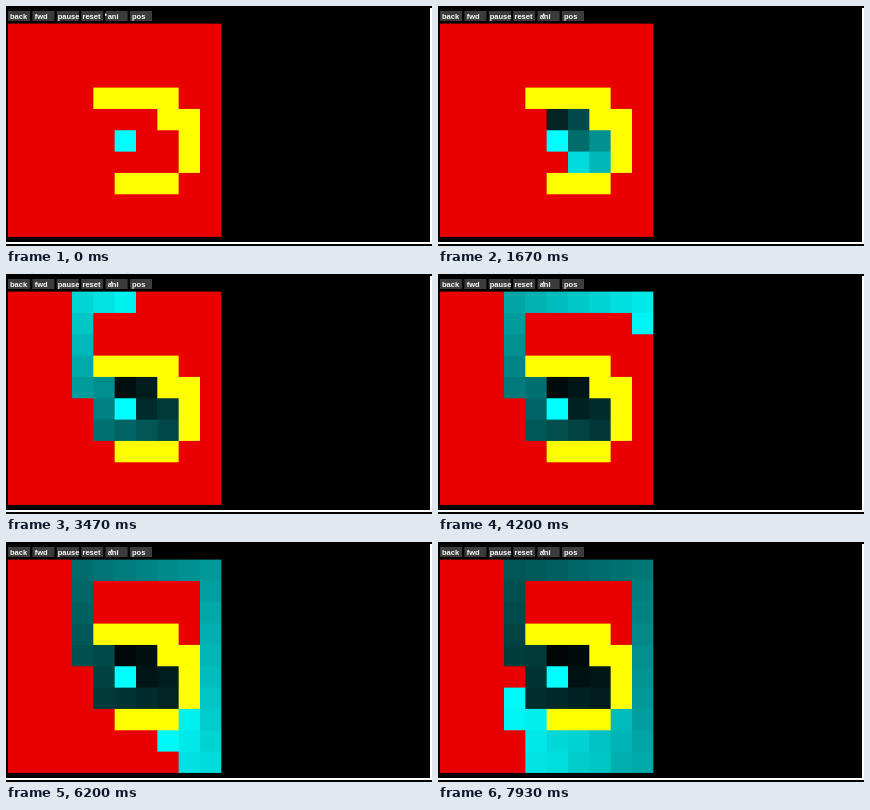
An HTML page with a canvas for the animation above (8000 ms loop, 426 by 240 pixels).

```html
<!DOCTYPE html>
<html lang="en">
<head>
<meta charset="utf-8">
<title>Depth-first walk</title>
<style>
  html, body { margin: 0; width: 100%; height: 100%; overflow: hidden; background: #000; }
  canvas { display: block; width: 426px; height: 240px; }
</style>
</head>
<body>
<canvas id="stage" width="426" height="240"></canvas>
<script>
const ctx = document.getElementById('stage').getContext('2d');

const LOOP = 8000, FRAME = 1000 / 15;
const WALK_START = 525, STEP = 1000 / 6;
const SIZE = 10, CELL = 64 / 3, LEFT = 2, TOP = 17.6;
const START = [5, 5];
const RED = '#e80000', YELLOW = '#ff0', CYAN = '#0ff';

// Wall runs: column, row, width, height
const WALLS = [[4, 3, 4, 1], [7, 4, 2, 1], [8, 5, 1, 2], [5, 7, 3, 1]];
const BUTTONS = ['back', 'fwd', 'pause', 'reset', 'ani', 'pos'];
const LABEL_X = [4, 28.7, 51.7, 76.5, 101.7, 126];

const cellKey = (col, row) => row * SIZE + col;

function isWall(col, row) {
  return WALLS.some(([c, r, w, h]) => col >= c && col < c + w && row >= r && row < r + h);
}

// Depth-first visiting rank of each cell, trying up, right, down, left
function explore() {
  const rank = new Map();
  function visit(col, row) {
    const key = cellKey(col, row);
    const inside = col >= 0 && row >= 0 && col < SIZE && row < SIZE;
    if (!inside || isWall(col, row) || rank.has(key)) return;
    rank.set(key, rank.size);
    visit(col, row - 1);
    visit(col + 1, row);
    visit(col, row + 1);
    visit(col - 1, row);
  }
  visit(...START);
  return rank;
}
const rank = explore();

function cellColor(col, row, count) {
  if (isWall(col, row)) return YELLOW;
  const k = rank.get(cellKey(col, row));
  if (k === 0) return CYAN;
  if (!(k <= count)) return RED;
  const level = Math.round(255 * k / (count + 1));
  return `rgb(0, ${level}, ${level})`;
}

// Adding light lets the soft edges of neighbouring cells blend without seams
function drawBoard(count) {
  ctx.globalCompositeOperation = 'lighter';
  for (let row = 0; row < SIZE; row++) {
    for (let col = 0; col < SIZE; col++) {
      ctx.fillStyle = cellColor(col, row, count);
      ctx.fillRect(LEFT + col * CELL, TOP + row * CELL, CELL, CELL);
    }
  }
  ctx.globalCompositeOperation = 'source-over';
}

function drawButtons() {
  ctx.font = 'bold 7.5px "Liberation Sans", Arial, sans-serif';
  BUTTONS.forEach((label, i) => {
    ctx.fillStyle = '#3c3c3c';
    ctx.fillRect(2 + i * 24.4, 5, 22, 10);
    ctx.fillStyle = '#fff';
    ctx.fillText(label, LABEL_X[i], 13);
  });
}

function drawPointer(t) {
  const x = 99 + 6 * Math.min(1, t / WALK_START);
  ctx.fillStyle = '#fff';
  ctx.beginPath();
  ctx.moveTo(x, 7);
  ctx.lineTo(x + 2, 9);
  ctx.lineTo(x, 10);
  ctx.fill();
}

function draw(t) {
  ctx.fillStyle = '#000';
  ctx.fillRect(0, 0, 426, 240);
  ctx.fillStyle = '#fff';
  ctx.fillRect(0, 236, 426, 2);
  ctx.fillRect(424, 2, 2, 235);

  drawButtons();
  drawPointer(t);
  drawBoard(Math.max(0, Math.floor((t - WALK_START) / STEP)));
}

let origin;
function tick(now) {
  origin ??= now;
  const t = (now - origin) % LOOP;
  draw(Math.floor(t / FRAME + 0.01) * FRAME);
  requestAnimationFrame(tick);
}
draw(0);
requestAnimationFrame(tick);
</script>
</body>
</html>
```
